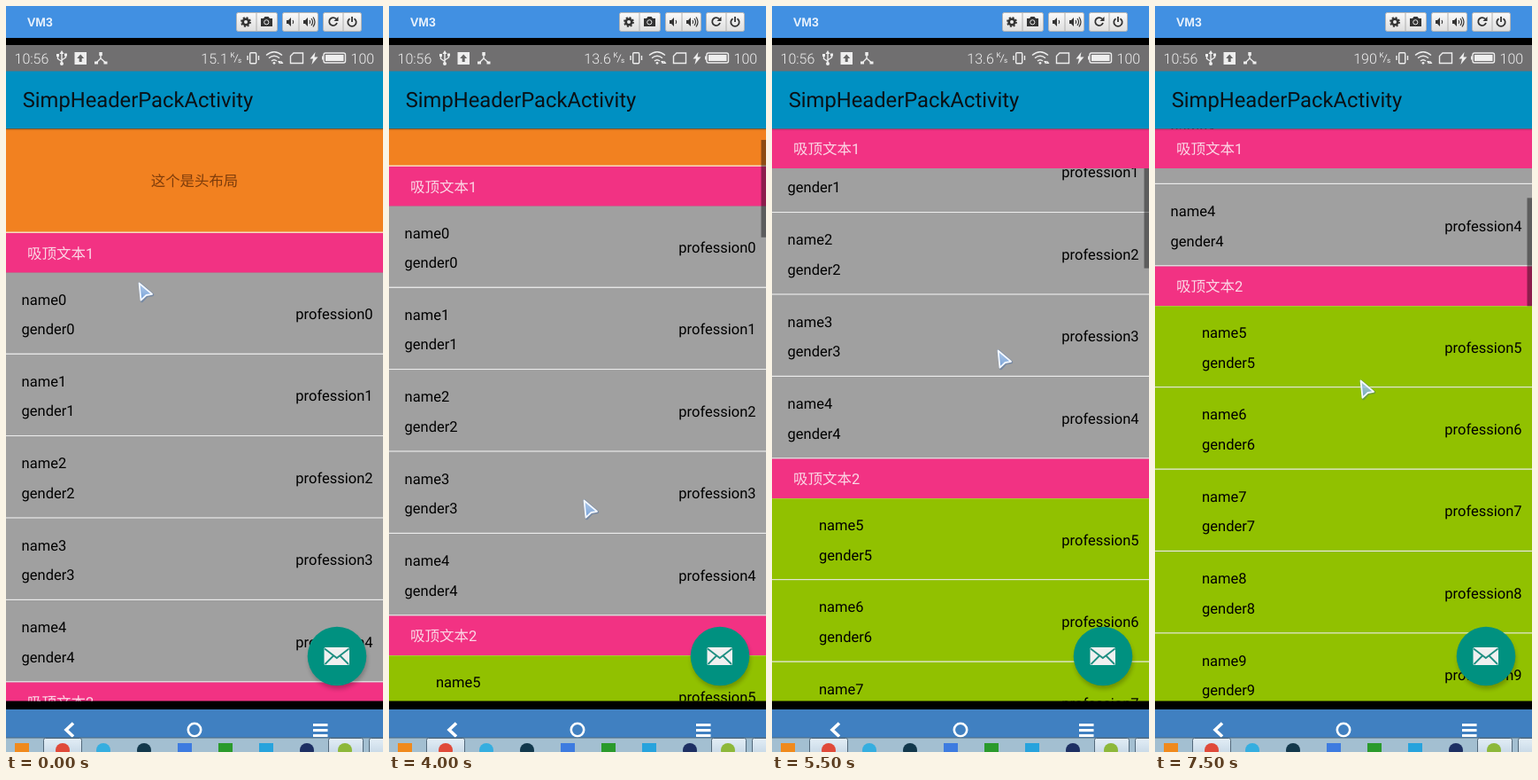
An HTML page that plays this animation: 426 px wide and 841 px high, repeating every 8000 ms.

```html
<!DOCTYPE html>
<html lang="zh">
<head>
<meta charset="utf-8">
<title>Sticky header list</title>
<style>
html, body { margin: 0; width: 100%; height: 100%; overflow: hidden; background: #000; }
svg { display: block; width: 426px; height: 841px; }
text {
  font-family: Roboto, "Noto Sans CJK SC", "Noto Sans CJK", sans-serif;
  font-size: 16.5px; text-rendering: geometricPrecision;
}
.cjk { font-size: 16.4px; font-weight: 300; }
.sticky text { fill: #fbd8e6; }
.status text { font-size: 16px; font-weight: 300; fill: #eee; }
.status .unit { font-size: 8px; font-weight: 400; }
.line { fill: none; stroke: #eee; stroke-width: 1.4; }
.dark { fill: none; stroke: #333; stroke-width: 1.8; }
.ink { fill: #333; }
.light { fill: #eee; }
</style>
</head>
<body>
<svg viewBox="0 0 426 841" xmlns="http://www.w3.org/2000/svg">
  <defs>
    <clipPath id="view"><rect y="138.500" width="426" height="645"/></clipPath>
    <linearGradient id="shade" x2="0" y2="1">
      <stop stop-color="#000" stop-opacity=".2"/><stop offset="1" stop-color="#000" stop-opacity="0"/>
    </linearGradient>
    <linearGradient id="glass" x2="0" y2="1">
      <stop stop-color="#b9d7fb"/><stop offset="1" stop-color="#6fa3e6"/>
    </linearGradient>
    <linearGradient id="key" x2="0" y2="1">
      <stop stop-color="#fafafa"/><stop offset="1" stop-color="#dedede"/>
    </linearGradient>
    <linearGradient id="task" x2="0" y2="1">
      <stop stop-color="#e3eef6"/><stop offset="1" stop-color="#c3d5e4"/>
    </linearGradient>
    <filter id="blur" x="-30%" y="-30%" width="160%" height="160%"><feGaussianBlur stdDeviation="2.5"/></filter>
  </defs>

  <rect width="426" height="841"/>

  <!-- window bar -->
  <rect width="426" height="36" fill="#4190e2"/>
  <text x="24" y="23" style="font:bold 14px 'Liberation Sans',Arial,sans-serif" fill="#e9f2fc">VM3</text>
  <g id="keys"></g>
  <circle cx="271" cy="18" r="3.3" class="dark" style="stroke-width:2.6"/>
  <circle cx="271" cy="18" r="5" class="dark" style="stroke-dasharray:2 1.93"/>
  <path class="ink" d="M288 14h3l1.5-2h4l1.5 2h3v9h-13z"/>
  <circle cx="294.3" cy="18.3" r="2.6" fill="#333" stroke="#eee"/>
  <path class="ink" d="M317 16h2l3-3v10l-3-3h-2zM336 16h2l3-3v10l-3-3h-2z"/>
  <path class="dark" style="stroke-width:1.2" d="M324 16q1.5 2 0 4M343 16q1.5 2 0 4M345 14q3 4 0 8M347 12.500q4 5.500 0 11"/>
  <path class="dark" d="M373 14.500A4.500 4.500 0 1 0 374 19"/>
  <path class="ink" d="M375.500 12v5h-5z"/>
  <path class="dark" d="M388.500 14.200a4.700 4.700 0 1 0 5 0M391 12v6"/>

  <!-- status bar -->
  <g class="status">
    <rect y="44" width="426" height="30" fill="#706f70"/>
    <text x="9.500" y="64.500">10:56</text>
    <path class="line" d="M63 53v11M58.500 56v3.500l4.500 3M67.500 55v3l-4.500 3"/>
    <path class="light" d="M63 50l2.500 4h-5zM57 54h3v3h-3zM66 53.500h3v3h-3z"/>
    <circle cx="63" cy="65" r="2" class="light"/>
    <rect x="77.500" y="52" width="13.500" height="14" class="light"/>
    <path d="M84.200 54.500l4 4.500h-2.500v4h-3v-4h-2.500z" fill="#666"/>
    <path class="line" d="M107 54v5l-5 5M107 59l5.500 5"/>
    <path class="light" d="M105.300 52h3.500v4h-3.500zM100 62.500h4v3h-4zM110.500 62.500h4v3h-4z"/>
    <text id="speed" x="250.800" y="64.500" text-anchor="end"></text>
    <text class="unit" x="253.500" y="57.500">K</text>
    <text class="unit" x="262" y="64">s</text>
    <path class="line" style="stroke-width:.9" d="M258 63.500l4-9"/>
    <rect x="275.700" y="52.700" width="7" height="12" rx="1" class="line"/>
    <path class="line" d="M273 56v5M285.500 56v5"/>
    <path class="line" d="M294 55.500q9-7.500 18 0M297 58.800q6-5 12 0M300 62q3-2.600 6 0"/>
    <circle cx="303" cy="64.300" r="1.400" class="light"/>
    <path id="traffic" class="light" d="M307 62h4l-2 3.500zM309.500 65l2-3 2 3z"/>
    <path class="line" d="M325 53h10.500v11.500h-14v-8z"/>
    <path class="light" d="M349.500 52l-6 7.500h3.500l-1.500 6.500 7-8.500h-4z"/>
    <rect x="359" y="53" width="24.500" height="11" rx="2" class="line"/>
    <path class="light" d="M361 55h20.500v7h-20.500zM357 56.500h1.500v4h-1.500z"/>
    <text x="389.500" y="64.500">100</text>
  </g>

  <rect y="73.500" width="426" height="65" fill="#0090c2"/>
  <text x="18.700" y="114" style="font-size:23.75px" fill="#0a1116">SimpHeaderPackActivity</text>

  <!-- list -->
  <g clip-path="url(#view)">
    <g id="list">
      <rect y="138" width="426" height="117" fill="#f28120"/>
      <text class="cjk" x="213" y="203" text-anchor="middle" fill="#7d3c0b">这个是头布局</text>
      <rect y="254.500" width="426" height="1.500" fill="#f7d9c0"/>
    </g>
    <rect id="thumb" x="420.500" width="5.500" fill="#000" fill-opacity=".42"/>
    <g id="pinned" class="sticky"></g>
    <rect y="138" width="426" height="3" fill="url(#shade)"/>
  </g>

  <!-- mail button -->
  <circle cx="375" cy="737" r="33" fill="#000" opacity=".24" filter="url(#blur)"/>
  <circle cx="374" cy="733" r="33.300" fill="#009180"/>
  <rect x="359.500" y="723" width="28.500" height="20" rx="1.500" fill="#f0f0f0"/>
  <path d="M360 724.500l13.800 10.500 13.800-10.500M360.500 742l9.500-9.500M387 742l-9.500-9.500" fill="none" stroke="#1f8f82" stroke-width="1.800"/>

  <!-- navigation keys and task bar -->
  <rect y="793" width="426" height="32" fill="#4080c1"/>
  <g fill="none" stroke="#fff" stroke-width="3">
    <path d="M76 808.500l-8 7.500 8 7.500" stroke-width="3.600"/>
    <circle cx="213" cy="816" r="7.200" stroke-width="2.600"/>
    <path d="M347 810.500h16.500M347 816.500h16.500M347 822.500h16.500"/>
  </g>
  <g id="tasks"><rect y="825" width="426" height="16" fill="#a3bfd1"/><rect y="824.500" width="426" height="1" fill="#506c80"/></g>

  <g id="cursor">
    <path d="M2 2L16.500 14.500 10 15.500 4.500 21.500z" fill="none" stroke="#2c5ea8" stroke-opacity=".35" stroke-width="3.400" stroke-linejoin="round"/>
    <path d="M1.500 1.500L16 13.800 9.500 15 3.500 20.700z" fill="url(#glass)" fill-opacity=".8" stroke="#f4f8ff" stroke-width="1.800" stroke-linejoin="round"/>
  </g>
</svg>
<script>
const $ = id => document.getElementById(id);
const add = (id, markup) => $(id).insertAdjacentHTML('beforeend', markup);
const box = (x, y, w, h, fill, extra = '') =>
  `<rect x="${x}" y="${y}" width="${w}" height="${h}" fill="${fill}" ${extra}/>`;
const text = (x, y, s, extra = '') => `<text x="${x}" y="${y}" ${extra}>${s}</text>`;

const TOP = 138.5, HEAD = 256, ROW = 92.4, BAND = 44.5;

const sticky = (y, n) => box(0, y, 426, BAND, '#f23283') + text(24, y + 28.5, '吸顶文本' + n);

function row(i) {
  const second = i > 4, x = second ? 53 : 17.6;
  const y = HEAD + BAND + i * ROW + (second ? BAND : 0);
  return box(0, y, 426, ROW + .5, second ? '#91c100' : '#a0a0a0') +
    text(x, y + 36, 'name' + i) + text(x, y + 69.5, 'gender' + i) +
    text(414.6, y + 52.5, 'profession' + i, 'text-anchor="end"') +
    box(0, y + ROW - 1.3, 426, 1.4, '#ececec') +
    (i % 5 ? '' : box(0, y - .5, 426, 1, '#eee', 'opacity=".45"'));
}

for (let i = 0; i < 10; i++) add('list', row(i));
[1, 2].forEach(n =>
  add('list', `<g class="sticky">${sticky(HEAD + (n - 1) * (BAND + 5 * ROW), n)}</g>`));
add('pinned', sticky(TOP, 1));

for (const [x, w, mid] of [[260, 47, 283], [312, 41, 331], [358, 44, 381]])
  add('keys', box(x + .5, 7.5, w - 1, 21, 'url(#key)', 'rx="2" stroke="#b5b5b5"') +
    box(mid - .5, 8, 1, 20, '#b0b0b0'));

for (const [x, w] of [[42.5, 43], [364.5, 39], [410.5, 30]])
  add('tasks', box(x, 825.5, w, 20, 'url(#task)', 'rx="2" stroke="#52687a"'));
['#f08a1d', '#e04a3a', '#35aee0', '#12384c', '#3d7be0', '#2a9a2c', '#27a3dd', '#1d2f63'].forEach((c, i) => {
  const x = 18 + i * 46;
  add('tasks', i % 2 && i !== 5 || i === 2
    ? `<circle cx="${x}" cy="839" r="8" fill="${c}"/>` : box(x - 8, 831, 16, 12, c));
});
add('tasks', '<circle cx="383" cy="839" r="8" fill="#8db83a"/>');

// scroll offset and pointer position, one pose per half second
const STEP = 500;
const poses = [
  [0, 149, 311], [0, 159, 339], [0, 403, 363], [0, 253, 378],
  [0, 284, 432], [0, 185, 396], [0, 365, 740], [22, 217, 610],
  [75, 219, 556], [128, 221, 499], [190, 238, 444], [252, 254, 387],
  [254, 226, 498], [254, 196, 608], [361, 214, 516], [469, 231, 421]
];
const show = (id, on) => $(id).style.display = on ? '' : 'none';

function draw(now) {
  const k = Math.floor(now / STEP) % poses.length;
  const [scroll, x, y] = poses[k];
  $('list').setAttribute('transform', `translate(0 ${-scroll})`);
  $('cursor').setAttribute('transform', `translate(${x} ${y})`);
  $('thumb').setAttribute('y', TOP + .166 * scroll);
  $('thumb').setAttribute('height', 107.5 + .031 * scroll);
  show('thumb', scroll && k !== 13);
  show('pinned', scroll > HEAD - TOP);
  show('traffic', k < 4 || (k > 7 && k < 13) || k > 14);
  $('speed').textContent = k < 1 ? '15.1' : k < 7 ? '13.9' : k < 13 ? '13.6' : '190';
}

const start = performance.now();
function tick() {
  draw(performance.now() - start);
  requestAnimationFrame(tick);
}
tick();
</script>
</body>
</html>
```
